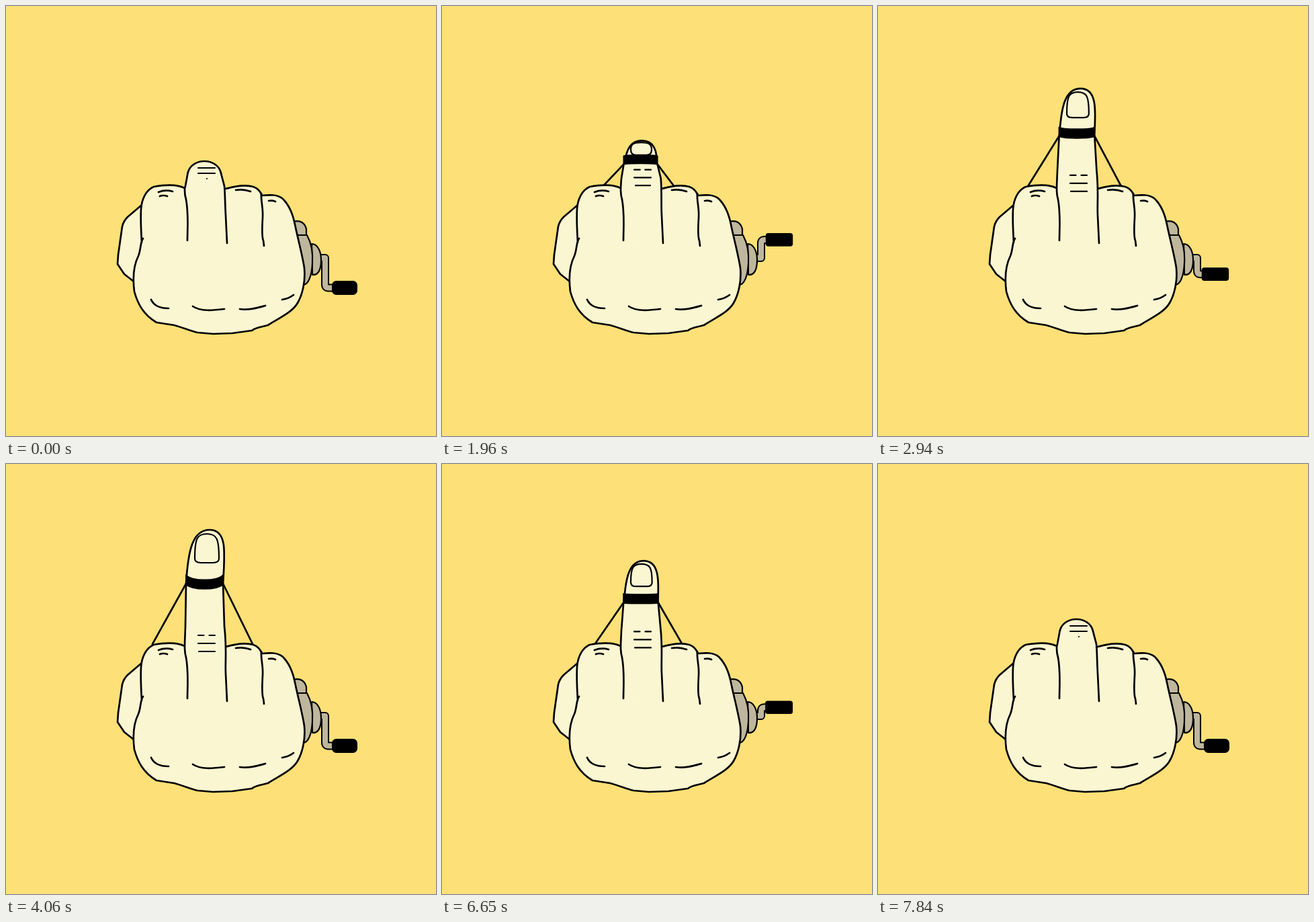
Recreate the animation shown at these times as an HTML page. Size 640 by 640 pixels, loop 8.05 s.

```html
<!DOCTYPE html>
<html lang="en">
<head>
<meta charset="utf-8">
<title>Crank hand</title>
<style>
  html, body { margin: 0; height: 100%; overflow: hidden; background: #fde077; }
  svg { display: block; width: 100vw; height: 100vh; }
  path { stroke: #000; stroke-width: 2.7; stroke-linecap: round; stroke-linejoin: round; fill: none; }
  .skin { fill: #fbf6d2; }
  .metal { fill: #bfb79d; stroke-width: 2.2; }
  #armEdge { stroke-width: 12; stroke-linecap: butt; }
  #armCore { stroke: #bfb79d; stroke-width: 8; stroke-linecap: butt; }
  #band { fill: #000; stroke-width: 2; }
  #nail, #creases { stroke-width: 2.2; }
</style>
</head>
<body>
<svg viewBox="0 0 640 640">
  <path id="armEdge"/><path id="armCore"/>
  <rect id="grip"/>
  <path class="metal" d="M455 354C463 354 469 364 469 378C469 392 465 401 456 400Z"/>
  <path class="metal" d="M428 321C438 318 445 323 447 332V342H430Z"/>
  <path class="metal" d="M432 341H448C454 352 457 368 456 383C455 402 450 415 442 415Z"/>
  <path class="skin" d="M201 297L181 314Q175 320 173 328L167 370L166 384L176 399L190 410L215 360Z"/>
  <path id="strings"/>
  <path class="skin" d="M204 346C200 350 201 362 197 372C191 384 188 402 191 425C196 443 204 459 224 471L250 475C262 478 275 484 285 486L308 488L337 487L366 483C372 478 380 478 390 475C407 464 426 456 434 442C441 430 446 410 444 390C441 370 434 345 430 325C427 310 422 297 412 287C404 280 392 281 381 282C378 275 374 271 368 269C355 265 340 269 327 272L266 271C256 266 242 265 220 269C208 274 202 288 201 302C200 318 201 332 202 352"/>
  <path d="M380 279C379 290 383 300 382 315C381 332 381 345 383 349L384 357"/>
  <path d="M216 437C220 446 230 450 242 450M278 447C290 455 308 453 325 451M348 451C362 453 375 449 386 446M411 437C418 436 424 433 428 430"/>
  <path d="M227 277Q237 273 248 276M229 283Q234 281 240 283M342 274Q353 272 364 276M391 290Q396 289 401 291"/>
  <path id="tip" class="skin"/>
  <path id="nail"/>
  <path id="band"/>
  <path id="finger" class="skin"/>
  <path id="creases"/>
</svg>
<script>
const LOOP = 8050, STEP = 70, UP = 1120, DOWN = 6160;
const el = id => document.getElementById(id);
const draw = (id, d) => el(id).setAttribute('d', d);
const clamp = x => Math.max(0, Math.min(1, x));

// Slow start, soft landing
function ease(x) {
  const u = Math.pow(clamp(x), 1.25);
  return u * u * (3 - 2 * u);
}

// Angle 0 points down; the first quarter turn comes towards the viewer
function drawCrank(angle) {
  const a = angle * Math.PI / 180, s = Math.sin(a), near = Math.max(0, s), far = Math.min(0, s);
  const y = 374.5 + 45 * Math.cos(a) - 1.5 * s * s;
  const left = 485 - 4 * Math.abs(s), right = 523 + 3 * near + far;
  const h = 21 + 5 * near + 1.5 * far, bend = Math.max(-5, Math.min(5, y - 375));
  // Seen end-on, the arm collapses into the axle
  const elbow = Math.abs(y - 375) < 6 ? '' : `H475V${y - bend}Q475 ${y} 480 ${y}`;
  const arm = `M464 375${elbow}H${left + 3}`;
  draw('armEdge', arm);
  draw('armCore', arm);
  const box = { x: left, y: y - h / 2, width: right - left, height: h, rx: 6.5 + 4 * near + 3 * far };
  for (const k in box) el('grip').setAttribute(k, box[k]);
}

// lift: 0 curled towards the viewer, 1 upright
function drawFinger(lift) {
  const root = Math.sqrt(lift), curl = Math.pow(1 - lift, 12), late = Math.pow(lift, 4);

  // The rim is the round knuckle when curled, the lower edge of the band later
  const l = 270.5 - 2.5 * late, r = 320 + 3 * lift, y = 249 - 71 * lift;
  const sag = 10 * late - 24 * curl, thick = 13 * (1 - curl);
  const kneeY = 268 - 26 * root, kneeR = 325 + 2 * root * (1 - lift);
  draw('finger', `M270 349C270 330 272 310 268 288C265 278 266 270 267 ${kneeY}L${l} ${y}` +
    `C${l + 5} ${y + sag} ${r - 5} ${y + sag} ${r} ${y}L${kneeR} ${kneeY}` +
    `C${326 + 3 * root} 276 326 296 327 312L329 353`);
  const top = y - thick;
  draw('band', `M${l} ${y}C${l + 5} ${y + sag} ${r - 5} ${y + sag} ${r} ${y}V${top}` +
    `C${r - 5} ${top + sag} ${l + 5} ${top + sag} ${l} ${top}Z`);

  const size = 80 * root, apexX = 296 + 7 * lift, apexY = y - size;
  const half = 15 + 11 * lift, cheek = y - .6 * size, inset = 2 * (1 - lift);
  draw('tip', `M${l + inset} ${y}C${l + 3} ${cheek} ${apexX - half} ${apexY} ${apexX} ${apexY}` +
    `C${apexX + half} ${apexY} ${r + 3 * lift} ${cheek} ${r - inset} ${y}`);

  const x1 = 281, x2 = 312 + 5 * late, w = x2 - x1, mid = x1 + w / 2;
  const h = 43 * root, y1 = apexY + 6 * root, y2 = y1 + h;
  const low = y2 - h * (.15 + .5 * Math.pow(1 - lift, 3));
  draw('nail', `M${x1} ${low}C${x1} ${y1 + .15 * h} ${x1 + .1 * w} ${y1} ${mid} ${y1}` +
    `C${x2 - .1 * w} ${y1} ${x2} ${y1 + .15 * h} ${x2} ${low}` +
    `Q${x2} ${y2} ${x2 - .25 * w} ${y2}H${x1 + .25 * w}Q${x1} ${y2} ${x1} ${low}Z`);

  const reach = 24 * lift - 30 * curl;
  draw('strings', `M${l} ${y}L${242 - reach} 268M${r} ${y}L${343 + reach} 268`);

  const row = 255 - 14 * (1 - lift), gap = 12 - 4 * curl, split = 3.5 * (1 - curl), last = 12 * (1 - curl);
  draw('creases', `M286 ${row}H${298 - split}M${299 + split} ${row}H311` +
    `M286 ${row + gap}H311M${299 - last} ${row + 2 * gap}h${2 * last}`);
}

function render(now) {
  const t = now % LOOP;
  const stepsSince = from => Math.max(0, Math.floor((t - from) / STEP) + 1);
  if (t < DOWN) {
    const n = stepsSince(UP);
    drawFinger(ease(n / 36));
    drawCrank(1080 * Math.pow(clamp(n / 38), 1.42));
  } else {
    const n = stepsSince(DOWN);
    drawFinger(ease(1 - n / 22));
    drawCrank(Math.min(720, 32 * n));
  }
}

const start = performance.now();
function tick() {
  render(performance.now() - start);
  requestAnimationFrame(tick);
}
tick();
</script>
</body>
</html>
```
